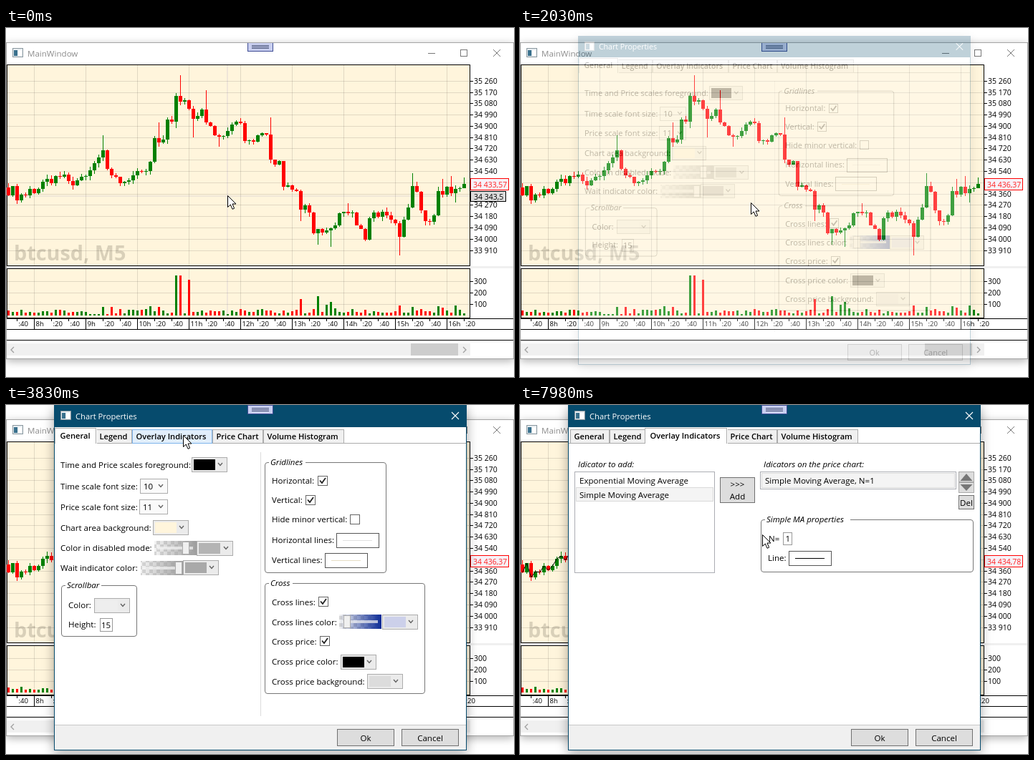
Animation of 709x488 px, one loop 8 s. Source, as an HTML page:

```html
<!DOCTYPE html>
<html lang="en">
<head>
<meta charset="utf-8">
<title>Chart window</title>
<style>
html, body { margin: 0; width: 709px; height: 488px; overflow: hidden; background: #fff; }
svg { display: block; font: 11.55px "Open Sans", "Noto Sans", sans-serif; cursor: none; }
text { white-space: pre; }
rect, .crisp { shape-rendering: crispEdges; }
rect[rx] { shape-rendering: auto; }
.i { font-style: italic; }
.b { font-weight: 600; font-size: 11.1px; }
.m { text-anchor: middle; }
.axis { font-size: 10.5px; }
.time { font-size: 9.6px; }
.mark { font-size: 28.8px; font-weight: 700; fill: #d9d0b9; }
.red { font-size: 10.5px; fill: #f22; }
.white { font-size: 11.2px; fill: #fff; }
#main .bar { fill: #fff; }
#main .edge { stroke: #a5a5a5; }
#main .cap { fill: #8c8c8c; }
#main .ctl { stroke: #777; }
#main .shade { filter: drop-shadow(0 3px 6px rgba(0,0,0,.3)); }
#main.on .bar { fill: #064b6d; }
#main.on .edge { stroke: #064b6d; }
#main.on .cap { fill: #fff; }
#main.on .ctl { stroke: #fff; }
#main.on .shade { filter: drop-shadow(0 5px 9px rgba(0,0,0,.42)); }
.pop { filter: drop-shadow(0 4px 8px rgba(0,0,0,.35)); }
.item { fill: none; stroke: none; }
.item.sel { fill: #cbe8f6; stroke: #26a0da; }
.item.hov { fill: #e5f3fb; stroke: #70c0e7; }
.item.off { fill: #f4f4f4; stroke: #dadada; }
.btn { fill: #ddd; stroke: #707070; }
.btn.hov { fill: #bee6fd; stroke: #3c7fb1; }
.btn.press { fill: #c4e5f6; stroke: #2c628b; }
</style>
</head>
<body>
<svg id="stage" width="709" height="488" viewBox="0 0 709 488" xmlns="http://www.w3.org/2000/svg"></svg>
<script>
const DARK = '#064b6d', GREY = '#acacac', GRID = 'rgba(0,0,0,.118)', CROSS = 'rgba(0,10,151,.118)';
const $ = id => document.getElementById(id);
const rect = (x, y, w, h, fill, stroke = 'none', more = '') =>
  `<rect x="${x}" y="${y}" width="${w}" height="${h}" fill="${fill}" stroke="${stroke}" ${more}/>`;
// One-pixel frame from corner to corner, on pixel centres.
const box = (x1, y1, x2, y2, fill, stroke, more) =>
  rect(x1 + .5, y1 + .5, x2 - x1, y2 - y1, fill, stroke, more);
const text = (x, y, s, cls = '') => `<text x="${x}" y="${y}" class="${cls}">${s}</text>`;
const path = (d, stroke, w = 1, more = '') =>
  `<path d="${d}" fill="none" stroke="${stroke}" stroke-width="${w}" ${more}/>`;
const hline = (x1, x2, y, c) => rect(x1, y, x2 - x1, 1, c);
const vline = (x, y1, y2, c) => rect(x, y1, 1, y2 - y1, c);
const group = (id, inner) => `<g id="${id}">${inner}</g>`;
const noise = n => { const v = Math.sin(n * 12.9898) * 43758.5453; return v - Math.floor(v); };

/* ---- chart ---- */
const closes = [
  234, 221, 241, 233, 234, 225, 231, 225, 215, 211, 217, 207, 208, 205, 214, 220, 213, 208, 207, 199,
  189, 181, 171, 197, 206, 208, 217, 215, 213, 206, 200, 201, 200, 187, 154, 160, 156, 128, 131, 95,
  103, 101, 113, 127, 123, 114, 132, 137, 150, 152, 151, 144, 135, 131, 133, 158, 157, 159, 150, 147,
  149, 184, 191, 186, 222, 220, 226, 228, 254, 248, 258, 287, 281, 286, 283, 280, 276, 259, 257, 259,
  258, 276, 281, 296, 266, 258, 264, 257, 262, 268, 273, 292, 268, 251, 221, 229, 255, 270, 271, 262,
  228, 233, 222, 231, 225, 224, 218];
const highs = { 22: 150, 35: 132, 40: 66, 46: 87, 61: 125, 79: 245, 94: 203, 101: 211, 103: 207, 106: 209 };
const lows = { 39: 140, 43: 153, 49: 166, 68: 270, 72: 303, 75: 306, 91: 318, 97: 276, 104: 244 };
const volumes = { 22: 12, 24: 12, 33: 13, 35: 12, 39: 56, 40: 56, 42: 50, 68: 23, 72: 27, 74: 15, 75: 19,
  76: 10, 91: 14, 94: 12, 100: 13, 101: 11, 104: 14 };
const midX = i => 3 + 6 * i;

function candles() {
  let out = '', open = 223;
  closes.forEach((c, i) => {
    const x = midX(i), top = Math.min(open, c), low = Math.max(open, c);
    const color = c < open ? '#008000' : '#f00';
    const hi = highs[i] || Math.round(top - noise(i + 1) * 6);
    const lo = lows[i] || Math.round(low + noise(i + 300) * 6);
    const v = volumes[i] || Math.round(2 + noise(i + 600) * 7);
    out += vline(x, hi, lo, color) + rect(x - 2, top, 5, Math.max(1, low - top), color)
      + rect(x - 1, 402 - v, 3, v, color);
    open = c;
  });
  return out;
}

function scales() {
  let grid = '', labels = '';
  const level = (y, label) => {
    grid += hline(2, 647, y, GRID);
    labels += hline(648, 652, y, '#000') + text(653, y + 4.4, label, 'axis');
  };
  for (let k = 0; k < 16; k++) {
    const n = 35260 - 90 * k;
    level(Math.round(73.8 + 15.78 * k), `${Math.floor(n / 1000)} ${String(n % 1000).padStart(3, '0')}`);
  }
  for (let k = 1; k < 4; k++) level(402 - 16 * k, k * 100);
  for (let k = -1; k < 26; k++) {
    const x = 39 + 24 * k, m = (k + 3) % 3;
    if (!m) grid += vline(x, 52, 332, GRID) + vline(x, 337, 405, GRID);
    labels += vline(x, 406, m ? 410 : 421, '#000')
      + text(x + 2.5, 417.4, m ? `:${m * 20}` : `${8 + k / 3}h`, 'time');
  }
  return [grid, labels];
}

const handle = (x, y) => box(x, y, x + 35, y + 12, '#c9cff0', '#3f4d94')
  + [4, 6, 8].map(d => hline(x + 6, x + 30, y + d, '#4a5578')).join('');
const icon = (x, y) => box(x, y, x + 14, y + 12, '#e8eef2', '#8a979e')
  + rect(x + 2, y + 3, 5, 8, '#39708c') + rect(x + 8, y + 3, 5, 8, '#fff');

function mainWindow() {
  const [grid, labels] = scales();
  const ma = closes.map((y, i) => `${midX(i) + .5} ${y}`).join('L');
  return `<g id="main">`
    + rect(0, 20, 709, 443, '#fff', 'none', 'class="shade"')
    + rect(0, 20, 709, 31, '#fff', 'none', 'class="bar"')
    + icon(9, 28) + text(30, 40, 'MainWindow', 'cap')
    + path('M589 35.5h10M634.5 30.5h9v9h-9z', '', 1, 'class="ctl crisp"')
    + path('M680 30l10 10M690 30l-10 10', '', 1, 'class="ctl"')
    + handle(337, 20)
    + rect(1, 333, 707, 3, '#f0f0f0')
    + box(1, 51, 647, 332, '#fff5dc', '#000') + box(1, 336, 647, 405, '#fff5dc', '#000')
    + text(11, 325, 'btcusd, M5', 'mark') + grid + candles()
    + group('ma', path('M' + ma, '#000'))
    + hline(1, 708, 406, '#000') + hline(1, 708, 421, '#000') + hline(1, 708, 436, '#000') + labels
    + group('cross', path('M309 52V405M2 235H647', CROSS)
      + box(648, 228, 697, 242, '#dcdcdc', '#000') + text(653, 240, '34 343,5', 'axis'))
    + box(648, 210, 701, 226, '#f7f1f8', '#f00') + `<text id="price" x="652" y="222.5" class="red"></text>`
    + rect(1, 441, 647, 17, '#f0f0f0') + rect(565, 441, 66, 17, '#cdcdcd')
    + path('M11 446l-4 4 4 4M638 446l4 4-4 4', '#a0a0a0', 1.3)
    + rect(.5, 20.5, 708, 442, 'none', '#a5a5a5', 'class="edge"') + `</g>`;
}

const menu = () => group('menu', box(309, 234, 434, 321, '#f4f4f4', '#999')
  + rect(310.5, 238.5, 123, 15, 'none', 'none', 'id="first" class="item"')
  + ['Settings', 'Load Settings', 'Save Settings As', 'Select New Security', 'Time Frame']
    .map((s, i) => text(320, 251 + 16 * i, s)).join('')
  + `<path d="M424 306v8l4-4z"/>`);

/* ---- dialog ---- */
const tabs = [['General', 70, 125], ['Legend', 125, 176], ['Overlay Indicators', 176, 288],
  ['Price Chart', 288, 359], ['Volume Histogram', 359, 472]];
const tab = ([name, a, b], fill, edge) => box(a, 34, b - 1, 53, fill, edge) + text(a + 5.5, 48, name, 'b');
const openTab = ([name, a, b]) => rect(a - 2, 32, b - a + 4, 22, '#fff')
  + path(`M${a - 1.5} 54V32.5H${b + .5}V54`, GREY, 1, 'class="crisp"') + text(a + 5.5, 47, name, 'b');

const chevron = (x, y) => path(`M${x - 3} ${y - 2}l3 3.5 3 -3.5`, '#606060', 1.3);
const combo = (x, y, w, color, label) => box(x, y, x + w, y + 20, label ? '#fafafa' : '#ebebeb', GREY)
  + (label ? text(x + 5, y + 15, label) : rect(x + 3, y + 3, 30, 15, color)) + chevron(x + w - 9, y + 10);
const slider = (x, y, grad, thumb) => rect(x, y, 59, 20, 'url(#check)') + rect(x, y, 59, 20, `url(#${grad})`)
  + rect(x + 4, y + 8, 50, 4, '#f4f4f4', 'none', 'opacity=".7"') + box(thumb, y + 1, thumb + 9, y + 18, '#f0f0f0', GREY);
const check = (x, y, on) => box(x, y, x + 13, y + 13, '#fff', '#666')
  + (on ? path(`M${x + 3} ${y + 6.5}l3 3.5 5 -7`, '#222', 1.8) : '');
const pen = (x, y, color) => box(x, y, x + 59, y + 20, '#fff', '#555') + hline(x + 9, x + 50, y + 10, color);
const frame = (x1, y1, x2, y2, title, w) => box(x1, y1, x2, y2, 'none', '#777', 'rx="3.5"')
  + rect(x1 + 6, y1 - 1, w, 3, '#fff') + text(x1 + 8, y1 + 4, title, 'i');

const general = () => group('general', openTab(tabs[0])
  + text(76, 88, 'Time and Price scales foreground:') + combo(259, 73, 49, '#000')
  + text(76, 118, 'Time scale font size:') + combo(187, 103, 38, '', '10')
  + text(76, 147, 'Price scale font size:') + combo(186, 132, 39, '', '11')
  + text(76, 176, 'Chart area background:') + combo(205, 161, 49, '#fff5dc')
  + text(76, 204, 'Color in disabled mode:') + slider(207, 190, 'toGrey', 246) + combo(266, 190, 50, '#b4b4b4')
  + text(76, 232, 'Wait indicator color:') + slider(188, 218, 'toGrey', 236) + combo(247, 217, 49, '#a9a9a9')
  + frame(77, 252, 182, 323, 'Scrollbar', 50)
  + text(87, 284, 'Color:') + combo(123, 270, 49, '#eee')
  + text(87, 311, 'Height:') + box(131, 298, 148, 316, '#fff', '#999') + text(133, 312, '15')
  + vline(355, 66, 435, '#dcdcdc')
  + frame(361, 80, 530, 234, 'Gridlines', 51)
  + text(371, 110, 'Horizontal:') + check(435, 99, 1)
  + text(371, 137, 'Vertical:') + check(418, 126, 1)
  + text(371, 164, 'Hide minor vertical:') + check(480, 153)
  + text(371, 193, 'Horizontal lines:') + pen(461, 179, '#e1e1e1')
  + text(371, 221, 'Vertical lines:') + pen(445, 207, '#e6ddc4')
  + frame(361, 249, 584, 403, 'Cross', 33)
  + text(371, 280, 'Cross lines:') + check(436, 268, 1)
  + text(371, 308, 'Cross lines color:') + slider(465, 293, 'toBlue', 471) + combo(525, 293, 49, '#ccd0ea')
  + text(371, 335, 'Cross price:') + check(438, 323, 1)
  + text(371, 363, 'Cross price color:') + combo(467, 349, 49, '#000')
  + text(371, 391, 'Cross price background:') + combo(504, 376, 49, '#dcdcdc'));

const entry = (id, y, s) => rect(78.5, y + .5, 191, 19, 'none', 'none', `id="${id}" class="item"`) + text(83, y + 15, s);
const button = (x1, y1, x2, y2, s, y, more = '') => box(x1, y1, x2, y2, '', '', `class="btn" ${more}`)
  + text((x1 + x2 + 1) / 2, y, s, 'm');

const overlay = () => group('overlay', openTab(tabs[2])
  + text(81, 87, 'Idicator to add:', 'i') + text(340, 87, 'Idicators on the price chart:', 'i')
  + group('before', box(76, 93, 271, 180, '#fff', '#abadb3') + box(335, 93, 608, 96, '#fff', '#abadb3')
    + box(336, 160, 632, 179, '#fff', '#777', 'rx="3.5"') + rect(342, 159, 6, 3, '#fff'))
  + group('after', box(76, 93, 271, 234, '#fff', '#abadb3') + box(335, 93, 608, 117, '#fff', '#abadb3')
    + box(337, 95, 606, 115, '#f4f4f4', '#dadada') + text(342, 110, 'Simple Moving Average, N=1')
    + frame(336, 160, 632, 233, 'Simple MA properties', 119)
    + text(347, 191, 'N=') + box(367, 178, 379, 195, '#fff', '#999') + text(370.5, 191, '1')
    + text(346, 218, 'Line:') + pen(375, 204, '#000'))
  + entry('ema', 95, 'Exponential Moving Average') + entry('sma', 115, 'Simple Moving Average')
  + button(279, 101, 327, 136, '&gt;&gt;&gt;', 115, 'id="add"') + text(303.5, 132, 'Add', 'm')
  + box(612, 93, 633, 107, '#ddd', '#aaa') + box(612, 108, 633, 122, '#ddd', '#aaa')
  + '<path d="M614.5 106h17l-8.5-10zM614.5 111h17l-8.5 9z" fill="#777"/>'
  + button(612, 126, 633, 145, 'Del', 141));

const dialog = () => group('dialog', rect(67, -1, 576, 484, DARK, 'none', 'class="pop"')
  + rect(68, 31, 574, 451, '#fff') + icon(76, 8) + text(97, 19.5, 'Chart Properties', 'white')
  + path('M622 10l10 10M632 10l-10 10', '#fff', 1.1)
  + hline(68, 642, 53, GREY)
  + tabs.map(t => tab(t, '#f0f0f0', GREY)).join('')
  + tabs.map((t, i) => group('hover' + i, tab(t, '#e1eefb', '#7eb4ea'))).join('')
  + general() + overlay()
  + rect(68, 448, 574, 34, '#f0f0f0') + hline(68, 642, 447, '#c8c8c8')
  + button(462, 453, 541, 476, 'Ok', 470) + button(552, 453, 631, 476, 'Cancel', 470)
  + group('handle', handle(337, 0)));

const fade = (id, color) => `<linearGradient id="${id}"><stop stop-color="${color}" stop-opacity="0"/>
  <stop offset="1" stop-color="${color}"/></linearGradient>`;

$('stage').innerHTML = `<defs>${fade('toGrey', '#9d9d9d')}${fade('toBlue', '#0a2a96')}
  <pattern id="check" width="10" height="10" patternUnits="userSpaceOnUse">
  ${rect(0, 0, 10, 10, '#f4f4f4') + rect(0, 0, 5, 5, '#d6d6d6') + rect(5, 5, 5, 5, '#d6d6d6')}</pattern></defs>`
  + mainWindow() + menu() + dialog()
  + '<circle id="halo" r="12" fill="#ff0" fill-opacity=".47"/>'
  + '<path id="cursor" d="M.5 .5V16.5L4.3 13 7 19.3 9.6 18.2 7 12H12z" fill="#fff" stroke="#000"/>';

/* ---- motion ---- */
const linear = p => p, out = p => 1 - (1 - p) ** 2, inOut = p => p * p * (3 - 2 * p);
// start, end, steps, target x, target y, easing
const moves = [
  [1110, 1350, 4, 322, 244, linear],
  [2680, 3440, 11, 326, 48, inOut],
  [3530, 3830, 5, 247, 42, out],
  [5070, 5070, 1, 248, 48, linear],
  [5150, 5870, 10, 161, 132, inOut],
  [6400, 6790, 6, 304, 125, out],
  [7660, 7980, 5, 338, 181, linear]];
const clicks = [[540, 710], [1810, 1880], [4400, 4460], [6100, 6175], [7020, 7090]];

function pointer(t) {
  let x = 309, y = 234;
  for (const [a, b, n, tx, ty, ease] of moves) {
    if (t < a) break;
    const p = t >= b ? 1 : ease((Math.floor((t - a) / (b - a) * (n - 1)) + 1) / n);
    x += (tx - x) * p;
    y += (ty - y) * p;
  }
  return [Math.round(x), Math.round(y)];
}

const show = (id, on) => { $(id).style.display = on ? '' : 'none'; };
const mark = (id, cls) => $(id).setAttribute('class', cls);
const within = (t, a, b) => t >= a && t < b;

function draw(t) {
  const [x, y] = pointer(t);
  const spot = `translate(${x} ${y})`;
  $('cursor').setAttribute('transform', spot);
  $('halo').setAttribute('transform', spot);
  show('halo', clicks.some(([a, b]) => within(t, a, b)));

  mark('main', within(t, 540, 2030) ? 'on' : '');
  $('price').textContent = t < 330 ? '34 433,57' : t < 6175 ? '34 436,37' : '34 434,78';
  show('cross', t < 710);
  show('ma', t >= 7340);

  show('menu', within(t, 710, 2030));
  $('menu').style.opacity = t < 795 ? .33 : t < 880 ? .67 : 1;
  mark('first', y > 238 ? 'item sel' : 'item');

  show('dialog', t >= 2030);
  const [alpha, k] = t < 2120 ? [.25, .95] : t < 2210 ? [.6, .98] : t < 2280 ? [.9, .994] : [1, 1];
  $('dialog').style.opacity = alpha;
  $('dialog').setAttribute('transform', k < 1 ? `translate(355 235) scale(${k}) translate(-355 -235)` : '');
  show('handle', t >= 2280);
  tabs.forEach(([, a, b], i) => show('hover' + i, t >= 2280 && within(y, 34, 54) && within(x, a, b)));
  show('general', t < 4460);
  show('overlay', t >= 4460);

  const added = t >= 7180, picked = t >= 6175;
  show('before', !added);
  show('after', added);
  mark('ema', picked ? 'item' : 'item sel');
  mark('sma', picked ? (t < 7090 ? 'item sel' : 'item off') : within(y, 115, 135) && x < 270 ? 'item hov' : 'item');
  mark('add', within(t, 7020, 7090) ? 'btn press' : t >= 6720 && y < 137 ? 'btn hov' : 'btn');
}

function tick() {
  draw(performance.now() % 8000);
  requestAnimationFrame(tick);
}
tick();
</script>
</body>
</html>
```
